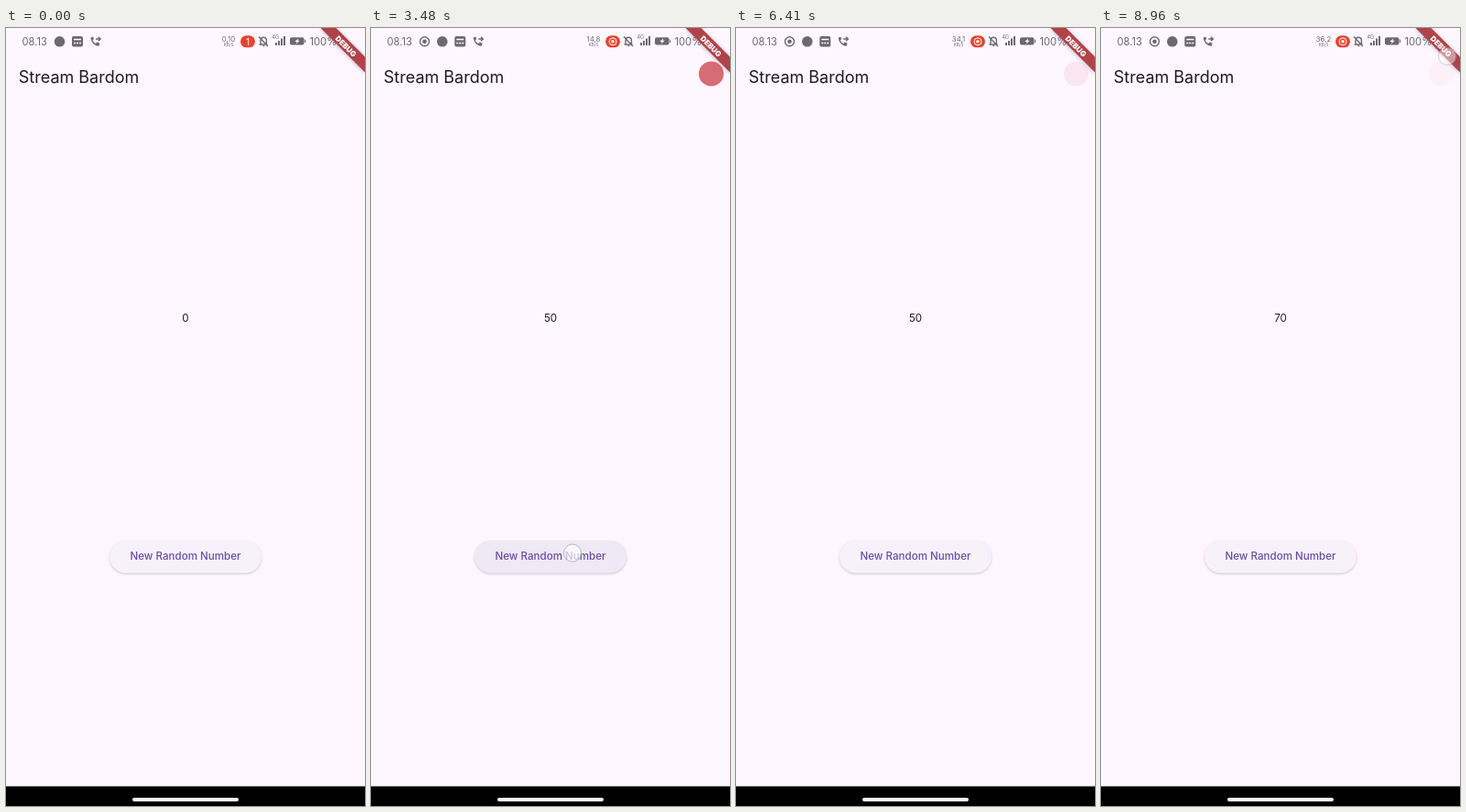
Recreate the animation shown at these times as an HTML page. Size 392 by 850 pixels, loop 8.98 s.

```html
<!DOCTYPE html>
<html lang="en">
<head>
<meta charset="utf-8">
<title>Random number stream</title>
<style>
  html, body { margin: 0; width: 100%; height: 100%; overflow: hidden; background: #fef7ff; }
  svg { display: block; width: 392px; height: 850px; font-family: Inter, Roboto, sans-serif; }
  .mid { text-anchor: middle; }
  .line { fill: none; stroke: #6c6870; stroke-width: 1.4; }
  #status { fill: #6c6870; }
  #button { filter: drop-shadow(0 1px 1px #9a90a880); }
</style>
</head>
<body>
<svg viewBox="0 0 392 850">
  <defs>
    <clipPath id="pill"><rect x="113" y="560" width="166" height="35.5" rx="17.7"/></clipPath>
    <radialGradient id="ink">
      <stop offset=".5" stop-color="#dccfee"/>
      <stop offset="1" stop-color="#dccfee" stop-opacity="0"/>
    </radialGradient>
  </defs>
  <rect width="392" height="850" fill="#fef7ff"/>

  <g id="status">
    <text x="17.5" y="19" font-size="11.2">08.13</text>
    <g id="recIcon">
      <circle class="line" cx="58.5" cy="14.8" r="5"/>
      <circle cx="58.5" cy="14.8" r="2.3"/>
    </g>
    <g id="notes">
      <circle cx="58.5" cy="14.8" r="5.8"/>
      <rect x="72" y="9" width="12" height="11.5" rx="2"/>
      <path d="M74 12.5h8M74 16.5h2m1 0h2m1 0h2" stroke="#fef7ff" stroke-width="1.5"/>
      <path d="M92.5 10.5c.3 5 4 9 9 9.2l.7-3.2-2.8-1-1.5 1.4c-1.6-.9-2.6-2-3.4-3.5l1.4-1.4-.9-2.5z"/>
      <path class="line" d="M98 12h5m-2.3-2.3l2.5 2.3-2.5 2.3" stroke-width="1.2"/>
    </g>
    <g class="mid">
      <text id="speed" x="243" y="15" font-size="7.8"></text>
      <text x="243" y="20" font-size="4.6">KB/S</text>
    </g>
    <rect x="256" y="8.3" width="16" height="13" rx="6.5" fill="#e5432f"/>
    <text id="count" class="mid" x="264" y="18.5" font-size="10" fill="#fff">1</text>
    <g id="ring" fill="#fff">
      <circle cx="264" cy="14.8" r="4" fill="none" stroke="#fff"/>
      <circle cx="264" cy="14.8" r="1.8"/>
    </g>
    <path class="line" d="M276.5 18h9M278 17.5v-4a3.2 3.2 0 0 1 6.4 0v4M276 9.5l10 10.5" stroke-width="1.2"/>
    <path d="M279.8 19h2.8l-1.4 1.4z"/>
    <text x="290.5" y="12" font-size="5.5">4G</text>
    <path d="M294 16h2v3h-2zm3-2h2v5h-2zm3-2.5h2V19h-2zm3-2.5h2v10h-2z"/>
    <rect x="310" y="10.3" width="15.5" height="8.2" rx="2"/>
    <path d="M326.2 12.7h1v3.4h-1z"/>
    <path d="M319.3 11.2l-4 3.7h2.3l-.8 2.6 4-3.7h-2.3z" fill="#fef7ff"/>
    <text x="331.5" y="19" font-size="11.2">100%</text>
  </g>

  <text x="13.8" y="60" font-size="18" fill="#1d1b20">Stream Bardom</text>
  <text id="number" class="mid" x="196" y="321.2" font-size="11.6" fill="#1d1b20"></text>

  <g id="button"><rect id="face" x="113" y="560" width="166" height="35.5" rx="17.7"/></g>
  <g clip-path="url(#pill)"><circle id="ripple" cx="220" cy="576" fill="url(#ink)"/></g>
  <text class="mid" x="196" y="581.2" font-size="11.6" font-weight="500" fill="#6750a4">New Random Number</text>

  <circle id="dot" cx="371.5" cy="50" r="13.6" fill="#c62c3a"/>

  <path d="M343.5 0H360.5L392 31.5V48.5z" fill="#b0434a" style="filter:drop-shadow(0 1px 2px #80708080)"/>
  <text class="mid" transform="translate(371.3 19.8) rotate(45)" y="3.2" font-size="8.2" font-weight="900" fill="#fff">DEBUG</text>

  <circle id="touch" r="9.5" fill="#fff" fill-opacity=".65" stroke="#a5a0aa" stroke-opacity=".7"/>
  <rect y="828.5" width="392" height="22"/>
  <rect x="138" y="841" width="116" height="4" rx="2" fill="#fbf8fc"/>
</svg>
<script>
const LOOP = 8980, PULSE = 1120;
const taps = [2080, 3430, 4070, 5290, 6780, 8000];
const numbers = [[0, 0], [2240, 50], [6940, 90], [8160, 70]];
const speeds = [[0, "0,10"], [900, "0,47"], [3000, "14,8"], [4000, "34,1"], [7000, "39,0"], [8000, "36,2"]];
const idle = [247, 242, 250], pressed = [229, 221, 240];

const $ = id => document.getElementById(id);
const clamp = v => Math.max(0, Math.min(1, v));
const at = (list, t) => list.filter(([start]) => start <= t).pop()[1];
const mix = (a, b, k) => a.map((v, i) => Math.round(v + (b[i] - v) * k));
const show = (id, opacity) => $(id).setAttribute("opacity", opacity);

function draw(t) {
  const recording = t >= 700;
  show("recIcon", +recording);
  show("ring", +recording);
  show("count", +!recording);
  $("notes").setAttribute("transform", `translate(${recording ? 19.3 : 0})`);
  $("speed").textContent = at(speeds, t);
  $("number").textContent = at(numbers, t);

  // The record dot fades out, then jumps back to full strength.
  const phase = (t - 4260 + 4 * PULSE) % PULSE / PULSE;
  const closing = clamp((8960 - t) / 160);
  show("dot", recording ? Math.max(.03, (1 - phase) * closing) : 0);

  const age = t - (taps.filter(tap => tap <= t).pop() ?? -LOOP);
  const heat = Math.min(clamp(age / 110), clamp((680 - age) / 240));
  $("face").setAttribute("fill", `rgb(${mix(idle, pressed, heat)})`);
  $("ripple").setAttribute("r", 10 + 90 * clamp(age / 220));
  show("ripple", .75 * clamp((age - 60) / 60) * clamp((200 - age) / 60));

  const stopping = t >= 8900;
  $("touch").setAttribute("transform", stopping ? "translate(378 31)" : "translate(220 573.5)");
  show("touch", stopping ? .7 : clamp((150 - age) / 60));
}

function tick(now) {
  draw(now % LOOP);
  requestAnimationFrame(tick);
}
draw(0);
requestAnimationFrame(tick);
</script>
</body>
</html>
```
